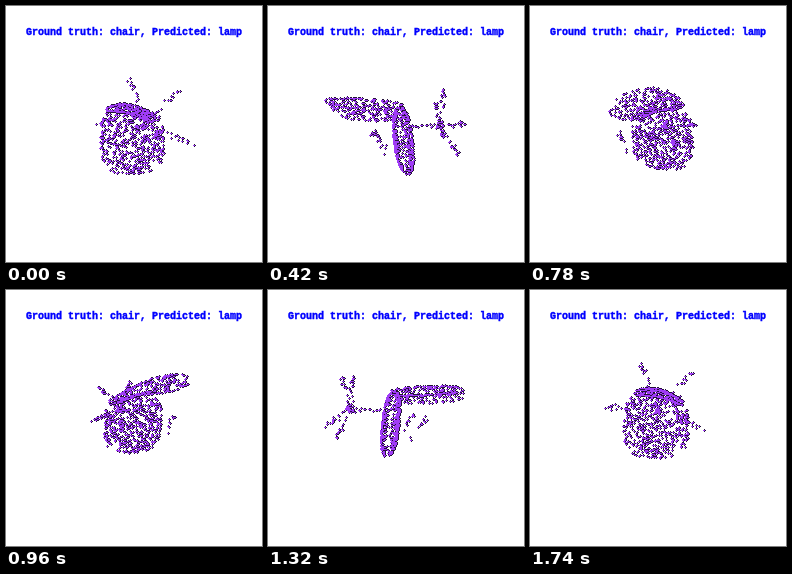
Recreate the animation shown at these times as an HTML page with a canvas. Size 256 px wide and 256 px high, loop 1.8 s.

```html
<!DOCTYPE html>
<html lang="en">
<head>
<meta charset="utf-8">
<title>Rotating point cloud</title>
<style>
  html, body { margin: 0; width: 100%; height: 100%; overflow: hidden; background: #fff; }
  canvas { position: absolute; left: 0; top: 0; }
  p {
    position: absolute; left: 20px; top: 21px; margin: 0;
    font: bold 10px/12px "Liberation Mono", "Courier New", monospace;
    color: #00f; -webkit-text-stroke: 0.4px #00f; white-space: pre;
  }
</style>
</head>
<body>
<canvas id="stage" width="256" height="256"></canvas>
<p>Ground truth: chair, Predicted: lamp</p>
<script>
const ctx = document.getElementById('stage').getContext('2d');
const STEP = 60, STEPS = 30;
const CX = 128, CY = 120, CAMERA = 180;
const AXIS = 10 * Math.PI / 180;

let seed = 20;
function rand() {
  seed = (seed + 0x6D2B79F5) | 0;
  let t = Math.imul(seed ^ (seed >>> 15), 1 | seed);
  t = (t + Math.imul(t ^ (t >>> 7), 61 | t)) ^ t;
  return ((t ^ (t >>> 14)) >>> 0) / 4294967296;
}
const spread = r => (rand() * 2 - 1) * r;

// Points are [forward, sideways, up] around the turning axis.
const points = [];

// Chair-aligned coordinates, turned by the chair's starting angle.
function addAligned(u, w, y) {
  const c = Math.cos(AXIS), s = Math.sin(AXIS);
  points.push([u * c - w * s, u * s + w * c, y]);
}

// Scatters points over a rounded, padded slab; h is the surface height -1..1.
function cushion(count, place) {
  while (count > 0) {
    const p = spread(1), q = spread(1);
    const r = Math.abs(p) ** 3 + Math.abs(q) ** 3;
    if (r > 1) continue;
    const h = Math.sqrt(1 - r) * (rand() < 0.5 ? -1 : 1);
    addAligned(...place(p, q, h));
    count--;
  }
}

const mix = (from, to, k) => from.map((v, j) => v + (to[j] - v) * k);

function rod(count, from, to, jitter) {
  for (let i = 0; i < count; i++) {
    const k = (i + rand()) / count;
    points.push(mix(from, to, k).map(v => v + spread(jitter)));
  }
}

// Seat
cushion(570, (p, q, h) => {
  const y = -13 + 32 * q;
  return [4.5 - 0.11 * y + 8 * h, -2 + 32 * p, y];
});

// Backrest
cushion(340, (p, q, h) => {
  const u = -30 + 37 * p, w = 27 * q;
  return [u, w, 18 - 0.055 * u - 0.22 * w - 0.009 * w * w + 4.5 * h];
});

// Armrests
for (const side of [-1, 1]) {
  for (let i = 0; i < 12; i++) {
    const k = rand();
    addAligned(-23 + 13 * k + spread(2), side * 31 + spread(2), -5 - 19 * k + spread(2));
  }
}

// Stem and five-armed base
const hub = [44, 8, 1];
rod(16, [13, 2, -1], hub, 2);
rod(10, hub, hub, 4);
const tips = [[47, -5, 39], [42, 37, 30], [53, 43, -13], [62, 3, -31], [61, -28, 2]];
for (const tip of tips) {
  rod(11, hub, tip, 2);
  rod(7, mix(hub, tip, 0.6), mix(hub, tip, 0.9), 2.5);
}

function project([a, b, y], angle) {
  const c = Math.cos(angle), s = Math.sin(angle);
  const scale = CAMERA / (CAMERA - (a * c - b * s));
  return [
    Math.round(CX + scale * (a * s + b * c)),
    Math.round(CY - scale * y)
  ];
}

function draw(step) {
  const dots = points.map(p => project(p, step / STEPS * 2 * Math.PI));
  ctx.clearRect(0, 0, 256, 256);
  ctx.fillStyle = '#24103a';
  for (const [x, y] of dots) {
    ctx.fillRect(x - 1, y, 3, 1);
    ctx.fillRect(x, y - 1, 1, 3);
  }
  ctx.fillStyle = '#a03cf6';
  for (const [x, y] of dots) ctx.fillRect(x - 1, y, 2, 1);
}

const start = performance.now();
let shown = -1;
function tick() {
  const step = Math.floor((performance.now() - start) / STEP) % STEPS;
  if (step !== shown) draw(shown = step);
  requestAnimationFrame(tick);
}
tick();
</script>
</body>
</html>
```
